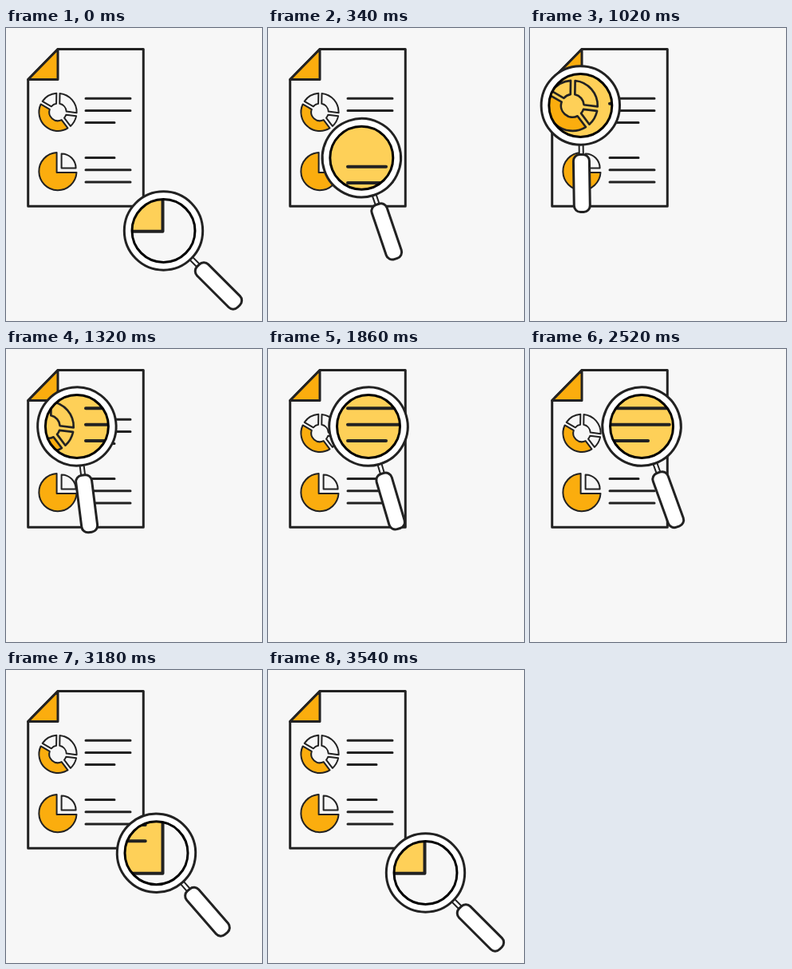
Write an HTML page that moves like this. It is 321 px wide and 367 px high and loops after 3.73 s.

```html
<!DOCTYPE html>
<html lang="en">
<head>
<meta charset="utf-8">
<title>Report under a magnifying glass</title>
<style>
  html, body { margin: 0; width: 100%; height: 100%; overflow: hidden; background: #f7f7f7; }
  svg { display: block; width: 321px; height: 367px; }
  .ink { stroke: #222; stroke-width: 3; stroke-linejoin: round; stroke-linecap: round; }
  .thin { stroke-width: 2; }
  .paper { fill: var(--paper); }
  .gold { fill: #fbad0e; }
  .white { fill: #fff; }
  .none { fill: none; }
</style>
</head>
<body>
<svg viewBox="0 0 321 367">
  <defs>
    <g id="page" class="ink">
      <path class="paper" d="M65 26.5H172.3V223.3H27.7V64.5Z"/>
      <path class="gold" d="M65 26.5V64.5H27.7Z"/>
      <path class="none" d="M100 88.2h56M100 103.4h56M100 118.6h36M100 162.6h36M100 177.8h56M100 193h56"/>
      <g id="donut" class="thin"></g>
      <path class="gold thin" d="M63.6 156V181H88.5A23.6 23.6 0 1 1 63.6 156Z"/>
      <path class="paper thin" d="M69.6 157.4V175.6H87.6A18.1 18.1 0 0 0 69.6 157.4Z"/>
    </g>
    <clipPath id="glass"><circle id="hole" r="39.5"/></clipPath>
  </defs>

  <use href="#page" style="--paper:#f7f7f7"/>
  <g id="lens" class="ink">
    <path class="white thin" d="M-2.5 49V63H2.5V49"/>
    <rect class="white" x="-10" y="61.5" width="20" height="72" rx="8"/>
    <circle class="white" r="49.2"/>
  </g>
  <g clip-path="url(#glass)">
    <rect width="321" height="367" fill="#f7f7f7"/>
    <use href="#page" transform="translate(-33.5 -43.4) scale(1.335)" style="--paper:#fed058"/>
  </g>
  <circle id="rim" class="none" r="39.5" stroke="#000" stroke-width="3"/>
</svg>
<script>
  const $ = id => document.getElementById(id);

  // Ring slices separated by parallel gaps
  const CX = 65, CY = 105.4, OUTER = 23.6, INNER = 10.8, GAP = 2.1;
  const point = (r, a) => `${CX + r * Math.cos(a)} ${CY + r * Math.sin(a)}`;

  function slice(from, to, fill) {
    const a = from * Math.PI / 180, b = to * Math.PI / 180;
    const o = Math.asin(GAP / OUTER), i = Math.asin(GAP / INNER);
    const large = b - a > Math.PI ? 1 : 0;
    return `<path class="${fill}" d="M${point(OUTER, a + o)}` +
      `A${OUTER} ${OUTER} 0 ${large} 1 ${point(OUTER, b - o)}` +
      `L${point(INNER, b - i)}` +
      `A${INNER} ${INNER} 0 ${large} 0 ${point(INNER, a + i)}Z"/>`;
  }

  $('donut').innerHTML =
    slice(-89, 7, 'paper') + slice(7, 53, 'paper') +
    slice(53, 210, 'gold') + slice(210, 271, 'paper');

  // Lens poses: x, y, handle angle
  const REST = [197.5, 254, 45], LEFT = [59.7, 97, 0], RIGHT = [140.4, 97, 20];
  const MOVES = [
    { start: 0, end: 880, from: REST, to: LEFT, ease: [0.256, 0.319] },
    { start: 880, end: 2660, from: LEFT, to: RIGHT, ease: [0.22, 0.29] },
    { start: 2660, end: 3540, from: RIGHT, to: REST, ease: [0.256, 0.319] }
  ];
  const LOOP = 3730, STEP = 20;

  // cubic-bezier(x1, 0, x2, 1)
  function bezier(u, [x1, x2]) {
    let lo = 0, hi = 1;
    for (let n = 0; n < 24; n++) {
      const s = (lo + hi) / 2, r = 1 - s;
      const x = 3 * s * r * r * x1 + 3 * s * s * r * x2 + s * s * s;
      if (x < u) lo = s; else hi = s;
    }
    return lo * lo * (3 - 2 * lo);
  }

  function pose(t) {
    const move = MOVES.find(m => t < m.end);
    if (!move) return REST;
    const p = bezier((t - move.start) / (move.end - move.start), move.ease);
    return move.from.map((v, i) => v + (move.to[i] - v) * p);
  }

  function draw() {
    const t = Math.floor(performance.now() % LOOP / STEP) * STEP;
    const [x, y, angle] = pose(t);
    $('lens').setAttribute('transform', `translate(${x} ${y}) rotate(${-angle})`);
    for (const id of ['hole', 'rim']) {
      $(id).setAttribute('cx', x);
      $(id).setAttribute('cy', y);
    }
    requestAnimationFrame(draw);
  }
  draw();
</script>
</body>
</html>
```
